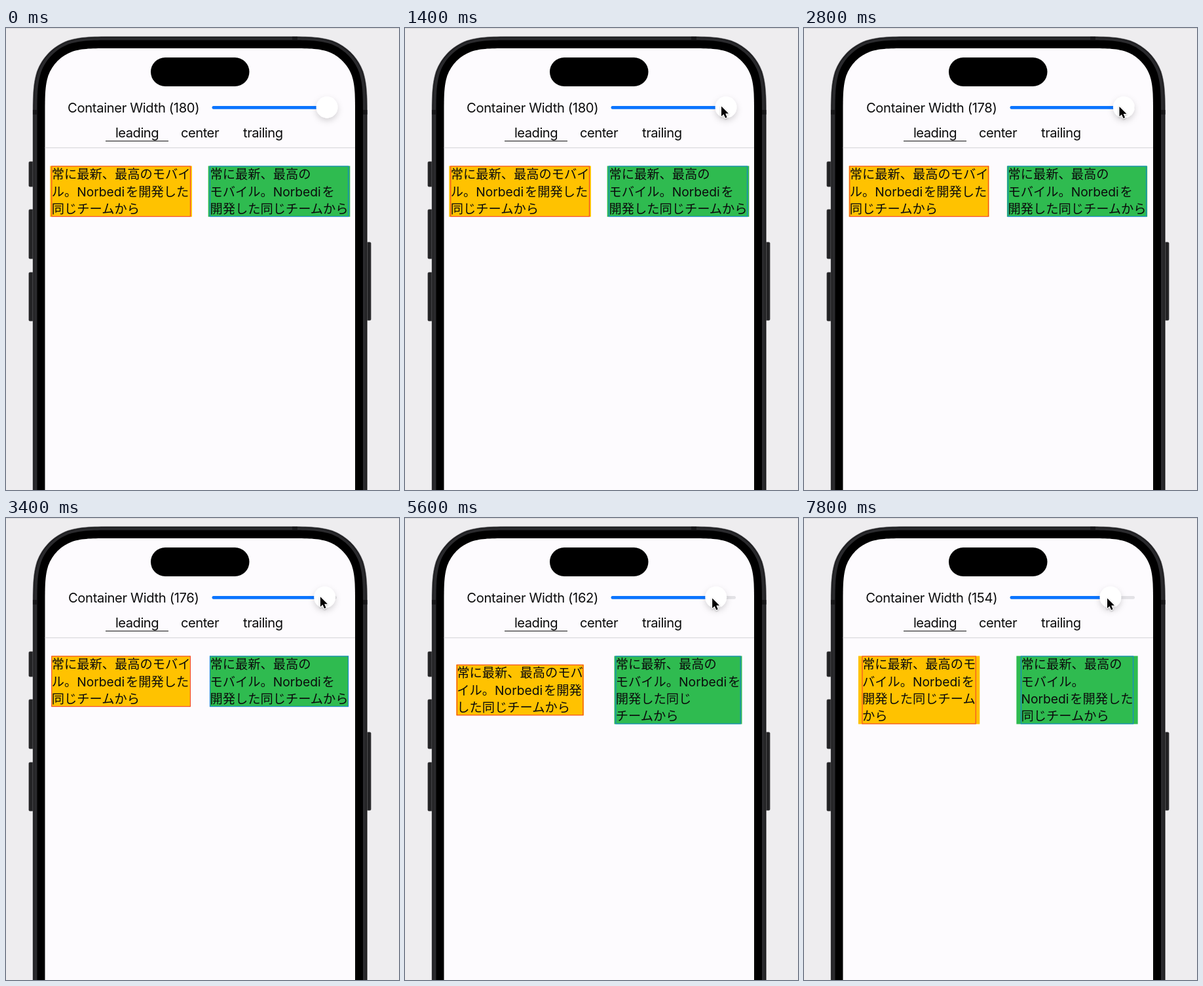
Animation, 600 px wide and 705 px high, one loop 8 s. Source, as an HTML page:

```html
<!DOCTYPE html>
<html lang="ja">
<head>
<meta charset="utf-8">
<title>Container Width</title>
<style>
  html, body { margin: 0; width: 100%; height: 100%; overflow: hidden; background: #eeedef; }
  svg { display: block; width: 600px; height: 705px; }
  text { fill: #0b0b0c; }
  .ui { font: 20.2px Inter, Roboto, sans-serif; letter-spacing: -.5px; text-anchor: middle; }
  #label { letter-spacing: -.35px; }
  .copy { font: 19.26px Inter, "Noto Sans CJK JP", "Noto Sans CJK", sans-serif; }
  .frame { fill: none; stroke-width: 1.1; }
</style>
</head>
<body>
<svg viewBox="0 0 600 705">
  <defs>
    <filter id="shadow" x="-100%" y="-100%" width="300%" height="300%">
      <feDropShadow dx="0" dy="4" stdDeviation="5" flood-opacity=".17"/>
    </filter>
    <filter id="soft" x="-50%" y="-50%" width="200%" height="200%">
      <feDropShadow dx="0" dy="1" stdDeviation="1" flood-opacity=".3"/>
    </filter>
  </defs>

  <path d="M0 .5H600" stroke="#d8d7d9"/>

  <!-- phone -->
  <g fill="#232325" stroke="#3c3c3e" stroke-width=".8">
    <rect x="35" y="204" width="9" height="38" rx="1.5"/>
    <rect x="35" y="277" width="9" height="75" rx="1.5"/>
    <rect x="35" y="373" width="9" height="74" rx="1.5"/>
    <rect x="548.5" y="327" width="8.5" height="119" rx="1.5"/>
  </g>
  <g id="body"></g>
  <path d="M437 13h8v5.5h-8zM41 125h6.5v7h-6.5zM545 125h6.5v7h-6.5z" fill="#171719"/>
  <rect x="221" y="45" width="150.5" height="44" rx="22" fill="#000"/>

  <!-- controls -->
  <text id="label" class="ui" x="194.7" y="128.7"></text>
  <rect x="314.5" y="119.1" width="190.5" height="4.7" rx="2.35" fill="#e3e2e6"/>
  <rect id="fill" x="314.5" y="119.1" height="4.7" rx="2.35" fill="#0a74ff"/>
  <circle id="thumb" cy="121" r="16.4" fill="#fff" filter="url(#shadow)"/>
  <text class="ui" x="200" y="167.4">leading</text>
  <text class="ui" x="296" y="167.4">center</text>
  <text class="ui" x="392.3" y="167.4">trailing</text>
  <path d="M152 172.5H248" stroke="#111"/>
  <path d="M59.5 182.8H533" stroke="#d3d2d5"/>

  <g id="blocks"></g>
  <path id="cursor" d="M0 0V15.2L3.5 12 6.1 17.8 8.6 16.7 6.2 11H11Z" fill="#000"
        stroke="#fff" stroke-width="2" stroke-linejoin="round" paint-order="stroke" filter="url(#soft)"/>
</svg>
<script>
const LOOP = 8000, STEP = 200, POINT = 1.2036;
const TOP = 210.5, PITCH = 26.4;
const get = id => document.getElementById(id);

function add(parent, tag, attrs) {
  const node = document.createElementNS("http://www.w3.org/2000/svg", tag);
  set(node, attrs);
  return parent.appendChild(node);
}
function set(node, attrs) {
  for (const key in attrs) node.setAttribute(key, attrs[key]);
}

// Half of a smooth corner, from the top edge to the side edge, in units of its radius.
const corner = [[1.529, 0], [1.088, 0], [.868, 0], [.631, .075], [.373, .169],
  [.169, .373], [.075, .631], [0, .868], [0, 1.088], [0, 1.529]];

// A phone outline that runs off the bottom of the stage.
function shell(left, top, right, radius, attrs) {
  const place = (points, edge, side) =>
    points.map(([x, y]) => [edge + side * x * radius, top + y * radius].join(" "));
  const [p0, ...leftCurve] = place([...corner].reverse(), left, 1);
  const [p1, ...rightCurve] = place(corner, right, -1);
  add(get("body"), "path", { ...attrs,
    d: `M${left} 720L${p0}C${leftCurve}L${p1}C${rightCurve}L${right} 720Z` });
}
shell(41, 13, 551.5, 84.5, { fill: "#1b1b1d", stroke: "#77777a", "stroke-opacity": .6 });
shell(43, 15, 549.5, 82.5, { fill: "#2a2a2d" });
shell(47.5, 18.5, 545, 78, { fill: "#000" });
shell(59.5, 31, 533, 66, { fill: "#fdfbfe" });

// Each layout applies from its minimum container width upwards.
const blocks = [
  { center: 175.6, color: "#ffc200", line: "#f4442e", layouts: [
    [176, "常に最新、最高のモバイ/ル。Norbediを開発した/同じチームから"],
    [160, "常に最新、最高のモバ/イル。Norbediを開発/した同じチームから"],
    [158, "常に最新、最高のモ/バイル。Norbediを開/発した同じチームか/ら"],
    [0, "常に最新、最高のモ/バイル。Norbediを/開発した同じチーム/から"]] },
  { center: 417, color: "#2fbb50", line: "#1686cf", layouts: [
    [176, "常に最新、最高の/モバイル。Norbediを/開発した同じチームから"],
    [160, "常に最新、最高の/モバイル。Norbediを/開発した同じ/チームから"],
    [0, "常に最新、最高の/モバイル。/Norbediを開発した/同じチームから"]] }
];
for (const block of blocks) {
  block.back = add(get("blocks"), "rect", { fill: block.color });
  block.text = add(get("blocks"), "text", { class: "copy" });
  block.frame = add(get("blocks"), "rect", { class: "frame", stroke: block.line });
}

const linesFor = (block, width) => block.layouts.find(([min]) => width >= min)[1].split("/");
const heightOf = lines => PITCH * lines.length - 1.6;
// A hair space separates Latin letters from the kana after them.
const spaced = line => line.replace(/[a-z](?=を)/, "$&\u200a");

function drawBlock(block, lines, width, rowHeight) {
  const height = heightOf(lines), y = TOP + (rowHeight - height) / 2;
  const outer = width * POINT;
  set(block.back, { x: block.center - outer / 2, y, width: outer, height });

  block.text.replaceChildren();
  const spans = lines.map((line, i) => {
    const span = add(block.text, "tspan", { x: 0, y: y + 19.7 + i * PITCH });
    span.textContent = spaced(line);
    return span;
  });
  const inner = Math.max(...spans.map(span => span.getComputedTextLength()));
  const x = block.center - inner / 2;
  spans.forEach(span => set(span, { x }));
  set(block.frame, { x, y: y + .5, width: inner, height: height - 1 });
}

// Container width over time, linear between stops and snapped to even values.
const stops = [[0, 180], [2400, 180], [2600, 178], [2800, 178], [3200, 176], [3600, 176],
  [4200, 170], [4600, 168], [4800, 168], [5400, 162], [6000, 162], [6200, 160],
  [6600, 158], [7200, 158], [7400, 156], [7800, 154], [8000, 154]];

function widthAt(time) {
  const i = stops.findIndex(([end]) => end > time);
  const [t0, v0] = stops[i - 1], [t1, v1] = stops[i];
  return 2 * Math.round((v0 + (v1 - v0) * (time - t0) / (t1 - t0)) / 2);
}

function cursorAt(time, moved) {
  const away = (1 - Math.min(1, time / 1200)) ** 2;
  return [483 - moved * .77 + away * 130, 119.5 + Math.min(3, moved * .2) + away * 600];
}

function draw(time) {
  const width = widthAt(time), moved = 180 - width;
  const thumbX = 490 - moved * .85;
  get("label").textContent = `Container Width (${width})`;
  set(get("fill"), { width: thumbX - 314.5 });
  set(get("thumb"), { cx: thumbX });
  set(get("cursor"), { transform: `translate(${cursorAt(time, moved)})` });

  const copies = blocks.map(block => linesFor(block, width));
  const rowHeight = Math.max(...copies.map(heightOf));
  blocks.forEach((block, i) => drawBlock(block, copies[i], width, rowHeight));
}

const start = performance.now();
let shown = -1;
function tick() {
  const elapsed = (performance.now() - start) % LOOP;
  const time = Math.floor(elapsed / STEP) * STEP;
  if (time !== shown) draw(shown = time);
  requestAnimationFrame(tick);
}
tick();
</script>
</body>
</html>
```
